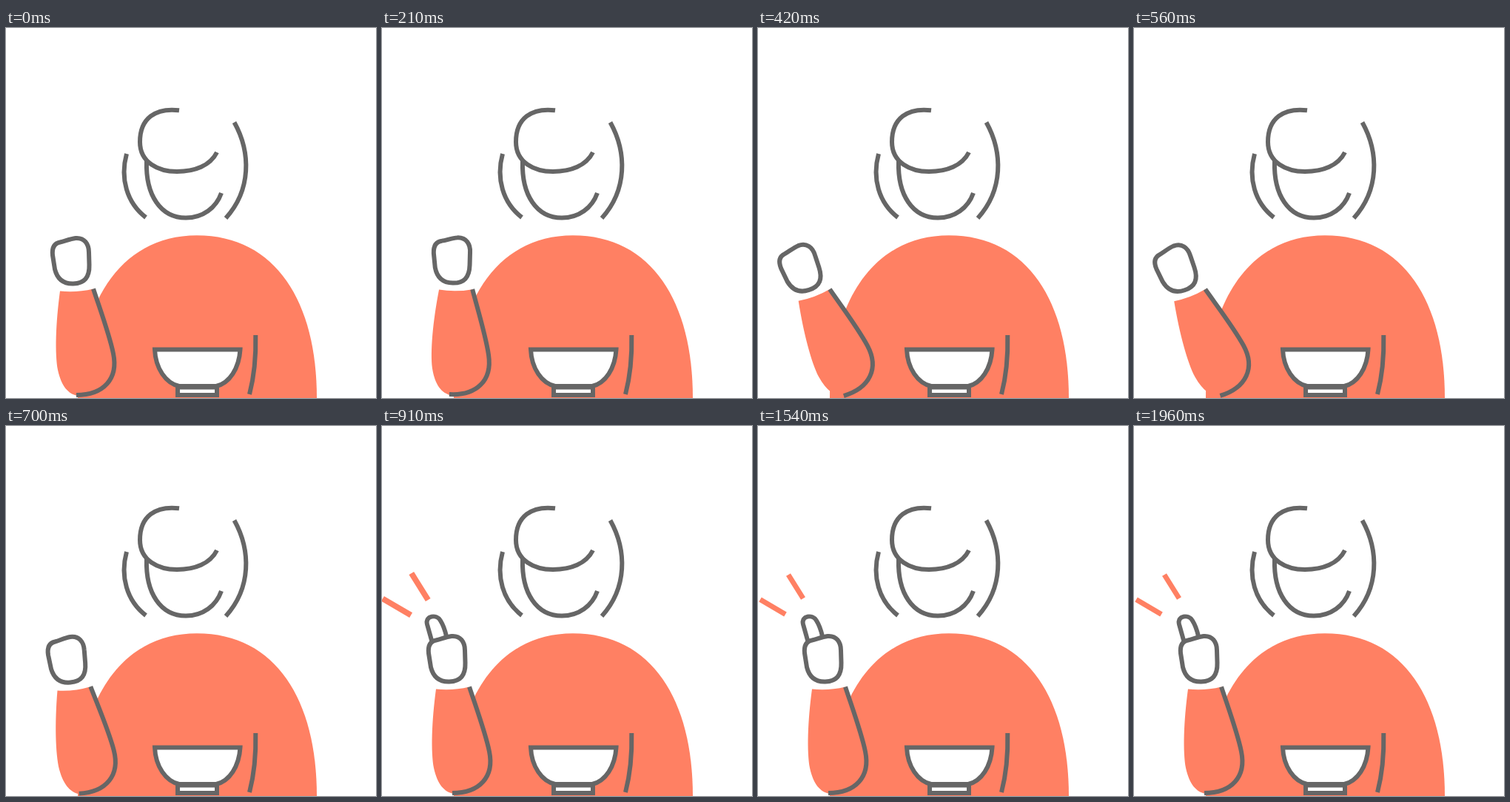
These frames come from a looping animation (500x500 px, 3.92 s). An HTML page:

```html
<!DOCTYPE html>
<html lang="en">
<head>
<meta charset="utf-8">
<title>Thumbs up</title>
<style>
  html, body { margin: 0; width: 100%; height: 100%; overflow: hidden; background: #fff; }
  svg { display: block; width: 100vw; height: 100vh; }
  .coral { fill: #ff8063; }
  .line { fill: none; stroke: #666; stroke-width: 6; }
  .white { fill: #fff; }
  .ray { stroke: #ff8063; stroke-width: 7; }
</style>
</head>
<body>
<svg viewBox="0 0 500 500">
  <path class="coral" d="M97 500C97 380 150 280.3 258 280.3C365 280.3 420 371 420 500Z"/>

  <g class="line">
    <path d="M163 170C154 203 163 236 189 256"/>
    <path d="M308.5 127.5C331 168 331.5 219 297 257"/>
    <path d="M190 180C188.5 226 209 256.5 243 256.5C266 256.5 284 243 291 223"/>
    <path d="M234 111.3C202 107.5 181 122 181 154C181 182 206 194 231 194C255 194 276 186 285 168"/>
    <path d="M337.3 415C338 445 335 472 329 495"/>
  </g>

  <g class="line white">
    <path d="M201 434.5H316.5C315 460 302 480 284 484H234C216 480 202 460 201 434.5Z"/>
    <path d="M232 485.5H285V496H232Z"/>
  </g>

  <g id="arm">
    <path class="coral" d="M73 355.5Q95 358 118 352.5C127 380 140 415 145 440C152 474 132 496 97 497C85 495 75 485 70 462C66 440 67 400 73 355.5Z"/>
    <path class="line" d="M118 352.5C127 380 140 415 145 440C152 474 132 496 95 496"/>
    <path id="thumb" class="line white" d="M68 293L61 268C58 256 74 254 79 263Q84 271 87 284"/>
    <path class="line white" d="M73 289.5C80 288 86 285 94 284C106 283 112 292 112 303L112.5 320C113 337 106 345 91 345.5C76 346 69 338 66 326L63 307C62 297 65 291 73 289.5Z"/>
  </g>

  <g transform="translate(51 217)"><path class="ray" d="M-10 -16L10 16"/></g>
  <g transform="translate(20 244.5)"><path class="ray" d="M-17 -10L17 10"/></g>
</svg>
<script>
  const LOOP = 3920, STEP = 70;
  const arm = document.getElementById('arm');
  const thumb = document.getElementById('thumb');
  const rays = document.querySelectorAll('.ray');

  const smooth = p => (1 - Math.cos(Math.PI * p)) / 2;
  const burst = p => 1 - (1 - p) ** 2.5;

  // Each key is [time, value, easing into this key].
  const swing = [[0, 0], [210, 3.3], [490, -20], [770, 0]];
  const rise = [[700, 34], [840, 0]];
  const spark = [[770, 0], [980, 1.2, burst], [1260, 0.88], [1400, 1]];

  function valueAt(keys, t) {
    if (t <= keys[0][0]) return keys[0][1];
    for (let i = 1; i < keys.length; i++) {
      const [t0, v0] = keys[i - 1];
      const [t1, v1, ease = smooth] = keys[i];
      if (t <= t1) return v0 + (v1 - v0) * ease((t - t0) / (t1 - t0));
    }
    return keys[keys.length - 1][1];
  }

  function draw(now) {
    const t = Math.floor((now - start) % LOOP / STEP) * STEP;
    const lift = valueAt(rise, t);
    const size = valueAt(spark, t);
    arm.setAttribute('transform', `rotate(${valueAt(swing, t)} 109 425)`);
    thumb.setAttribute('transform', `translate(${lift * 0.25} ${lift})`);
    thumb.style.visibility = t < 700 ? 'hidden' : 'visible';
    for (const ray of rays) {
      ray.setAttribute('transform', `scale(${size})`);
      ray.style.visibility = size ? 'visible' : 'hidden';
    }
  }

  const start = performance.now();
  function tick() {
    draw(performance.now());
    requestAnimationFrame(tick);
  }
  tick();
</script>
</body>
</html>
```
